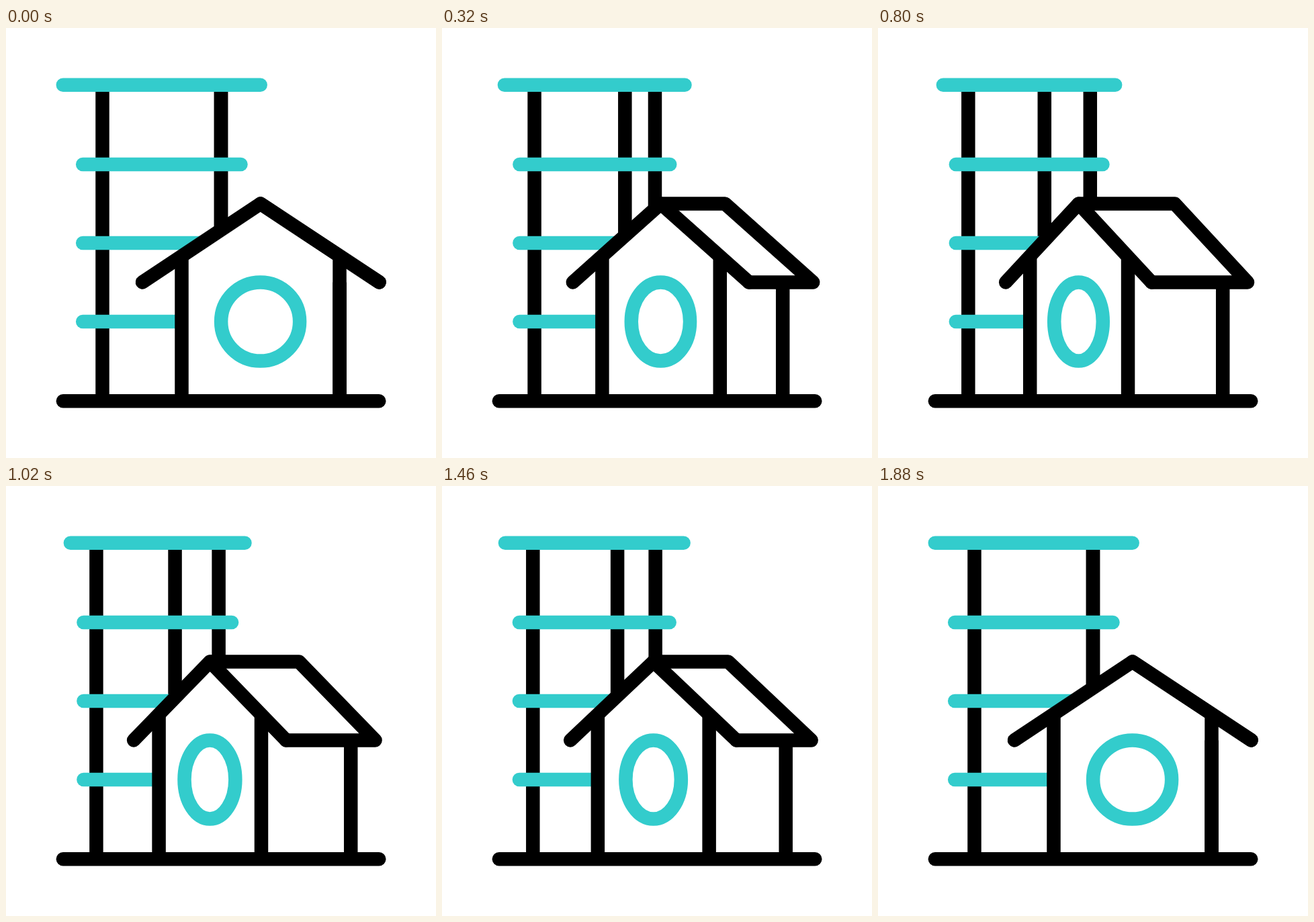
Animation of 640 by 640 pixels, one loop 2400 ms. Source, as an HTML page with a canvas:

```html
<!DOCTYPE html>
<html lang="en">
<head>
<meta charset="utf-8">
<title>Turning house and tower</title>
<style>
html, body { margin: 0; height: 100%; overflow: hidden; background: #fff; }
canvas { display: block; width: 100vmin; height: 100vmin; }
</style>
</head>
<body>
<canvas width="640" height="640"></canvas>
<script>
const ctx = document.querySelector('canvas').getContext('2d');
const BLACK = '#000', TEAL = '#33cccc', LOOP = 2400;
const TIMES = [0, 540, 1365, 1880];

// x positions: front view, fully turned, partly turned back
const POSES = {
  postL: [143.5, 134.3, 134.5],
  postM: [320, 245.5, 255.2],
  postR: [320, 315.3, 317.4],
  topL: [84.8, 97.5, 94.9],
  topR: [378.7, 351.8, 357.7],
  shelfL: [114.2, 116.1, 115],
  shelfR: [349.5, 333.5, 337.6],
  eaveL: [203, 190.2, 190],
  peak: [378.8, 295.7, 308.4],
  eaveR: [555.6, 401.2, 426.3],
  backPeak: [378.8, 445, 430.6],
  backEave: [555.6, 550.3, 549.1],
  wallL: [261.5, 225.4, 228.9],
  wallR: [496.5, 367.2, 387.7],
  backWall: [496.5, 513.2, 513.2],
  radius: [58.5, 35.3, 39.5]
};

function poseAt(t) {
  let i = 0;
  while (i < 2 && t >= TIMES[i + 1]) i++;
  const u = Math.min(1, (t - TIMES[i]) / (TIMES[i + 1] - TIMES[i]));
  const s = u * u * (3 - 2 * u);
  const pose = {};
  for (const key in POSES) {
    const v = POSES[key], a = v[i], b = v[(i + 1) % 3];
    pose[key] = a + (b - a) * s;
  }
  return pose;
}

function trace(points) {
  ctx.beginPath();
  points.forEach(([x, y]) => ctx.lineTo(x, y));
}

function line(color, cap, ...points) {
  trace(points);
  ctx.strokeStyle = color;
  ctx.lineCap = cap;
  ctx.stroke();
}

function fill(...points) {
  trace(points);
  ctx.fillStyle = '#fff';
  ctx.fill();
}

const bar = (color, x1, x2, y) => line(color, 'round', [x1, y], [x2, y]);
const upright = (x, top) => line(BLACK, 'butt', [x, top], [x, 555]);

function draw(p) {
  const base = 555.2, ridge = 261.5, eave = 378.4;
  ctx.fillStyle = '#fff';
  ctx.fillRect(0, 0, 640, 640);
  ctx.lineWidth = 20.5;
  ctx.lineJoin = 'round';

  // Tower
  [p.postL, p.postM, p.postR].forEach(x => upright(x, 85));
  bar(TEAL, p.topL, p.topR, 84.8);
  [203, 320, 437].forEach(y => bar(TEAL, p.shelfL, p.shelfR, y));

  // House
  fill([p.wallL, base], [p.wallL, 341], [p.peak, ridge], [p.wallR, 341], [p.wallR, base]);
  upright(p.backWall, eave);
  const side = [[p.peak, ridge], [p.backPeak, ridge], [p.backEave, eave], [p.eaveR, eave]];
  fill(...side);
  upright(p.wallL, 341);
  upright(p.wallR, 341);
  line(BLACK, 'round', ...side);
  line(BLACK, 'round', [p.eaveL, eave], [p.peak, ridge], [p.eaveR, eave]);
  bar(BLACK, 84.9, 555.2, base);

  ctx.beginPath();
  ctx.ellipse(p.peak - 0.2, 437, p.radius, 58.6, 0, 0, 2 * Math.PI);
  ctx.strokeStyle = TEAL;
  ctx.stroke();
}

const start = performance.now();
function frame() {
  draw(poseAt((performance.now() - start) % LOOP));
  requestAnimationFrame(frame);
}
frame();
</script>
</body>
</html>
```
